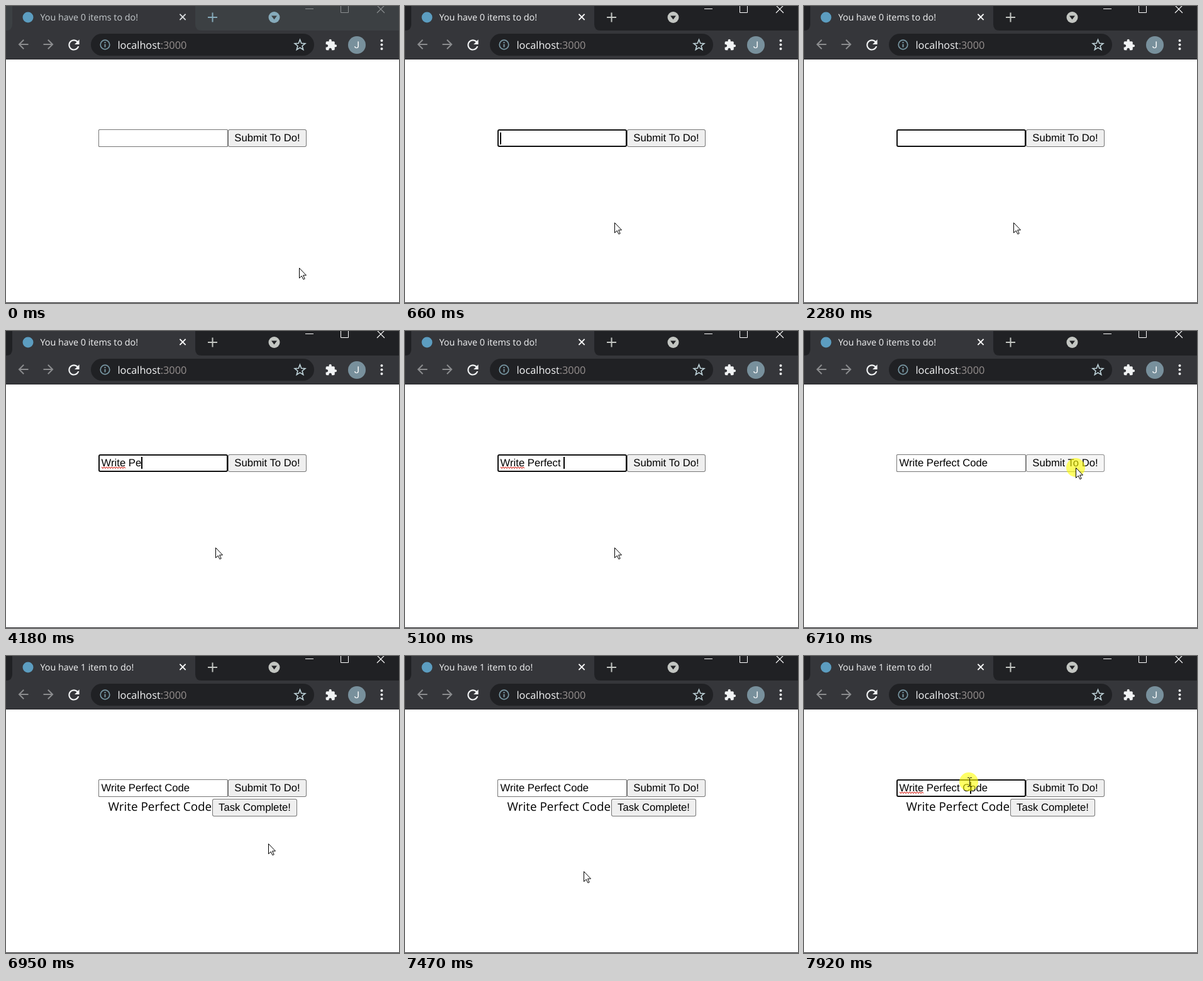
An HTML page with a canvas that plays this animation: 625x472 px, repeating every 8000 ms.

```html
<!DOCTYPE html>
<html lang="en">
<head>
<meta charset="utf-8">
<title>To do list</title>
<style>
  html, body { margin: 0; width: 100%; height: 100%; overflow: hidden; background: #fff; }
  canvas { display: block; }
</style>
</head>
<body>
<canvas id="stage" width="625" height="472"></canvas>
<script>
const ctx = document.getElementById('stage').getContext('2d');
const LOOP = 8000;
const UI = '"Open Sans", "Noto Sans", sans-serif';
const FORM = '16.667px "Liberation Sans", Arial, sans-serif';
const TASK = 'Write Perfect Code';
const TEXT_X = 151.6;

const ACTIVATE = 250, FOCUS = 660, PRESS = 6710, RELEASE = 6800, REFOCUS = 7890;
const KEYS = [2550, 2790, 3240, 3400, 3570, 3700, 3940, 4180, 4320,
  4520, 4660, 4820, 4990, 5100, 5320, 5460, 5520, 5690];

// Pointer moves: sampled every `step` ms along timed points [t, x, y]
const MOVES = [
  { step: 30, pts: [[0, 466, 416], [30, 400, 380], [60, 333, 344]] },
  { step: 34.5, pts: [[6190, 352, 333], [6290, 400, 309], [6390, 431, 278], [6470, 436, 245], [6569, 432, 217]] },
  { step: 33, pts: [[6800, 432, 217], [6850, 432, 245], [6900, 428, 280], [6980, 400, 325], [7130, 341, 456]] },
  { step: 45, pts: [[7290, 336, 440], [7380, 306, 385], [7470, 284, 342], [7605, 281, 298], [7750, 266, 226], [7875, 262, 200]] }
];

const ICONS = {
  back: new Path2D('M20 11H7.83l5.59-5.59L12 4l-8 8 8 8 1.41-1.41L7.83 13H20v-2z'),
  next: new Path2D('M12 4l-1.41 1.41L16.17 11H4v2h12.17l-5.58 5.59L12 20l8-8z'),
  reload: new Path2D('M17.65 6.35C16.2 4.9 14.21 4 12 4c-4.42 0-7.99 3.58-7.99 8s3.57 8 7.99 8c3.73 0 6.84-2.55 7.73-6h-2.08c-.82 2.33-3.04 4-5.65 4-3.31 0-6-2.69-6-6s2.69-6 6-6c1.66 0 3.14.69 4.22 1.78L13 11h7V4l-2.35 2.35z'),
  puzzle: new Path2D('M20.5 11H19V7c0-1.1-.9-2-2-2h-4V3.5C13 2.12 11.88 1 10.5 1S8 2.12 8 3.5V5H4c-1.1 0-2 .9-2 2v3.8h1.5c1.49 0 2.7 1.21 2.7 2.7s-1.21 2.7-2.7 2.7H2V20c0 1.1.9 2 2 2h3.8v-1.5c0-1.49 1.21-2.7 2.7-2.7s2.7 1.21 2.7 2.7V22H17c1.1 0 2-.9 2-2v-4h1.5a2.5 2.5 0 0 0 0-5z'),
  arrow: new Path2D('M.5 .5V16.5L4.2 13L6.9 18.5L9.2 17.5L6.6 12H11.5Z')
};

function rect(x, y, w, h, color) {
  ctx.fillStyle = color;
  ctx.fillRect(x, y, w, h);
}

function round(x, y, w, h, r, color) {
  ctx.fillStyle = color;
  ctx.beginPath();
  ctx.roundRect(x, y, w, h, r);
  ctx.fill();
}

function disc(x, y, r, color) {
  ctx.fillStyle = color;
  ctx.beginPath();
  ctx.arc(x, y, r, 0, 7);
  ctx.fill();
}

function line(color, width, ...pts) {
  ctx.strokeStyle = color;
  ctx.lineWidth = width;
  ctx.beginPath();
  for (let i = 0; i < pts.length; i += 2) ctx.lineTo(pts[i], pts[i + 1]);
  ctx.stroke();
}

function cross(x, y, r, color, width) {
  line(color, width, x - r, y - r, x + r, y + r);
  line(color, width, x + r, y - r, x - r, y + r);
}

function icon(path, x, y, scale, color) {
  ctx.save();
  ctx.translate(x, y);
  ctx.scale(scale, scale);
  ctx.fillStyle = color;
  ctx.fill(path);
  ctx.restore();
}

function text(str, x, y, font, color, align = 'left') {
  ctx.font = font;
  ctx.fillStyle = color;
  ctx.textAlign = align;
  ctx.fillText(str, x, y);
}

function star(x, y, r, color) {
  ctx.strokeStyle = color;
  ctx.lineWidth = 1.6;
  ctx.beginPath();
  for (let i = 0; i < 10; i++) {
    const a = i * Math.PI / 5, d = i % 2 ? r * 0.43 : r;
    ctx.lineTo(x + Math.sin(a) * d, y - Math.cos(a) * d);
  }
  ctx.closePath();
  ctx.stroke();
}

function drawTabs(active, title) {
  const tool = '#35363a';
  const strip = active ? '#202124' : '#3c4043';
  const control = active ? '#ffffff' : '#8c8f91';
  const accent = active ? '#c3c6c2' : '#86abbb';

  rect(0, 0, 625, 39, strip);
  ctx.fillStyle = tool;
  ctx.beginPath();
  ctx.moveTo(0, 39);
  ctx.quadraticCurveTo(10, 39, 10, 29);
  ctx.lineTo(10, 0);
  ctx.lineTo(301, 0);
  ctx.lineTo(301, 29);
  ctx.quadraticCurveTo(301, 39, 311, 39);
  ctx.fill();

  disc(35, 18, 8.5, '#5c9dc0');
  text(title, 54.5, 23, '14.35px ' + UI, active ? '#f4f5f6' : '#c6cbce');
  cross(281, 17.5, 4.6, active ? '#ffffff' : '#dadddf', 1.9);

  line(accent, 2, 321, 18, 336, 18);
  line(accent, 2, 328.5, 10.5, 328.5, 25.5);
  disc(426.5, 18, 9, accent);
  ctx.fillStyle = strip;
  ctx.beginPath();
  ctx.moveTo(422, 15.5);
  ctx.lineTo(431, 15.5);
  ctx.lineTo(426.5, 21.5);
  ctx.fill();

  line(control, 1, 476, 4.5, 489, 4.5);
  line(control, 1, 532.5, -2, 532.5, 10.5, 544.5, 10.5, 544.5, -2);
  cross(596, 5, 6, control, 1.1);
}

function drawToolbar() {
  rect(0, 39, 625, 46, '#35363a');
  rect(0, 84, 625, 1, '#27282b');
  icon(ICONS.back, 15.5, 49, 1, '#8b8c8e');
  icon(ICONS.next, 55.5, 49, 1, '#8b8c8e');
  icon(ICONS.reload, 95, 49, 1.08, '#f1f3f4');

  round(135, 44, 355, 35, 17.5, '#202124');
  ctx.strokeStyle = '#7897a3';
  ctx.lineWidth = 1.7;
  ctx.beginPath();
  ctx.arc(157.5, 61.5, 7.3, 0, 7);
  ctx.stroke();
  rect(156.5, 60.5, 2, 5, '#7897a3');
  rect(156.5, 57, 2, 2, '#7897a3');

  const font = '16.3px ' + UI;
  text('localhost', 177.5, 68, font, '#f4f5f6');
  text(':3000', 177.5 + ctx.measureText('localhost').width, 68, font, '#96908f');
  star(467.5, 62.3, 8.8, '#c1d6dc');
  icon(ICONS.puzzle, 507, 52, 0.83, '#f1f3f4');
  disc(558, 62, 14, '#78909c');
  text('J', 558, 67, '15px Roboto, sans-serif', '#ffffff', 'center');
  for (const y of [55, 61.5, 68]) disc(597.5, y, 2, '#f1f3f4');
}

function button(label, x, y, w, state) {
  const [edge, fill] = {
    idle: ['#767676', '#efefef'],
    hover: ['#4f4f4f', '#e5e5e5'],
    active: ['#8d8d8d', '#f5f5f5']
  }[state];
  round(x, y, w, 28, 3, edge);
  round(x + 1, y + 1, w - 2, 26, 2, fill);
  text(label, x + w / 2, y + 19, FORM, '#000000', 'center');
}

function drawField(t) {
  const focused = (t >= FOCUS && t < PRESS) || t >= REFOCUS;
  const count = KEYS.filter(k => k <= t).length;
  const typed = TASK.slice(0, count);

  const b = focused ? 2 : 1;
  round(147, 196, 206, 28, focused ? 3 : 1.5, focused ? '#101010' : '#767676');
  round(147 + b, 196 + b, 206 - 2 * b, 28 - 2 * b, 1, '#ffffff');
  text(typed, TEXT_X, 215, FORM, '#000000');
  if (!focused) return;

  if (count > 5) {
    const zigzag = [];
    for (let x = 152; x <= 190; x += 2) zigzag.push(x, x % 4 ? 218.2 : 216.2);
    line('#d8382f', 1.1, ...zigzag);
  }

  const since = t >= REFOCUS ? REFOCUS : count ? KEYS[count - 1] : FOCUS;
  if ((t - since) % 1080 < 520) {
    const before = t >= REFOCUS ? TASK.slice(0, 15) : typed;
    const x = Math.floor(TEXT_X + ctx.measureText(before).width);
    rect(x, count ? 200 : 201, 2, 19, '#000000');
  }
}

function pointerAt(t) {
  const move = MOVES.filter(m => m.pts[0][0] <= t).pop();
  const { pts, step } = move;
  const start = pts[0][0];
  const q = start + Math.floor((t - start) / step + 1e-6) * step;
  for (let i = 1; i < pts.length; i++) {
    const [t0, x0, y0] = pts[i - 1], [t1, x1, y1] = pts[i];
    if (q < t1) {
      const u = (q - t0) / (t1 - t0);
      return [Math.round(x0 + (x1 - x0) * u), Math.round(y0 + (y1 - y0) * u)];
    }
  }
  return pts[pts.length - 1].slice(1);
}

function drawPointer(t, x, y) {
  const pressed = (t >= ACTIVATE && t < 380) || (t >= PRESS && t < RELEASE) || t >= REFOCUS;
  if (pressed) disc(x, y, 15, 'rgba(255,255,0,0.6)');

  const overField = x > 147 && x < 353 && y > 196 && y < 224;
  if (overField) {
    const c = '#2a2a1c';
    line(c, 1, x + 1.5, y - 6, x + 1.5, y + 7);
    line(c, 1, x - 2, y - 6.5, x + 1, y - 6.5);
    line(c, 1, x + 2, y - 6.5, x + 5, y - 6.5);
    line(c, 1, x - 2, y + 7.5, x + 1, y + 7.5);
    line(c, 1, x + 2, y + 7.5, x + 5, y + 7.5);
    return;
  }
  icon(ICONS.arrow, x, y, 1, '#ffffff');
  ctx.save();
  ctx.translate(x, y);
  ctx.strokeStyle = '#000000';
  ctx.lineWidth = 1;
  ctx.stroke(ICONS.arrow);
  ctx.restore();
}

function draw(t) {
  const added = t >= RELEASE;
  const [px, py] = pointerAt(t);
  const over = px >= 353 && px < 478 && py >= 196 && py < 224;
  const state = t >= PRESS && t < RELEASE ? 'active' : over ? 'hover' : 'idle';

  ctx.textRendering = 'geometricPrecision';
  rect(0, 0, 625, 472, '#ffffff');
  drawTabs(t >= ACTIVATE, added ? 'You have 1 item to do!' : 'You have 0 items to do!');
  drawToolbar();
  drawField(t);
  button('Submit To Do!', 353, 196, 125, state);
  if (added) {
    text(TASK, 162.5, 246, '18.9px ' + UI, '#000000');
    button('Task Complete!', 328, 227, 135, 'idle');
  }
  rect(0, 471, 625, 1, '#2b2c2f');
  drawPointer(t, px, py);
}

const begin = performance.now();
function tick() {
  draw((performance.now() - begin) % LOOP);
  requestAnimationFrame(tick);
}
tick();
</script>
</body>
</html>
```
